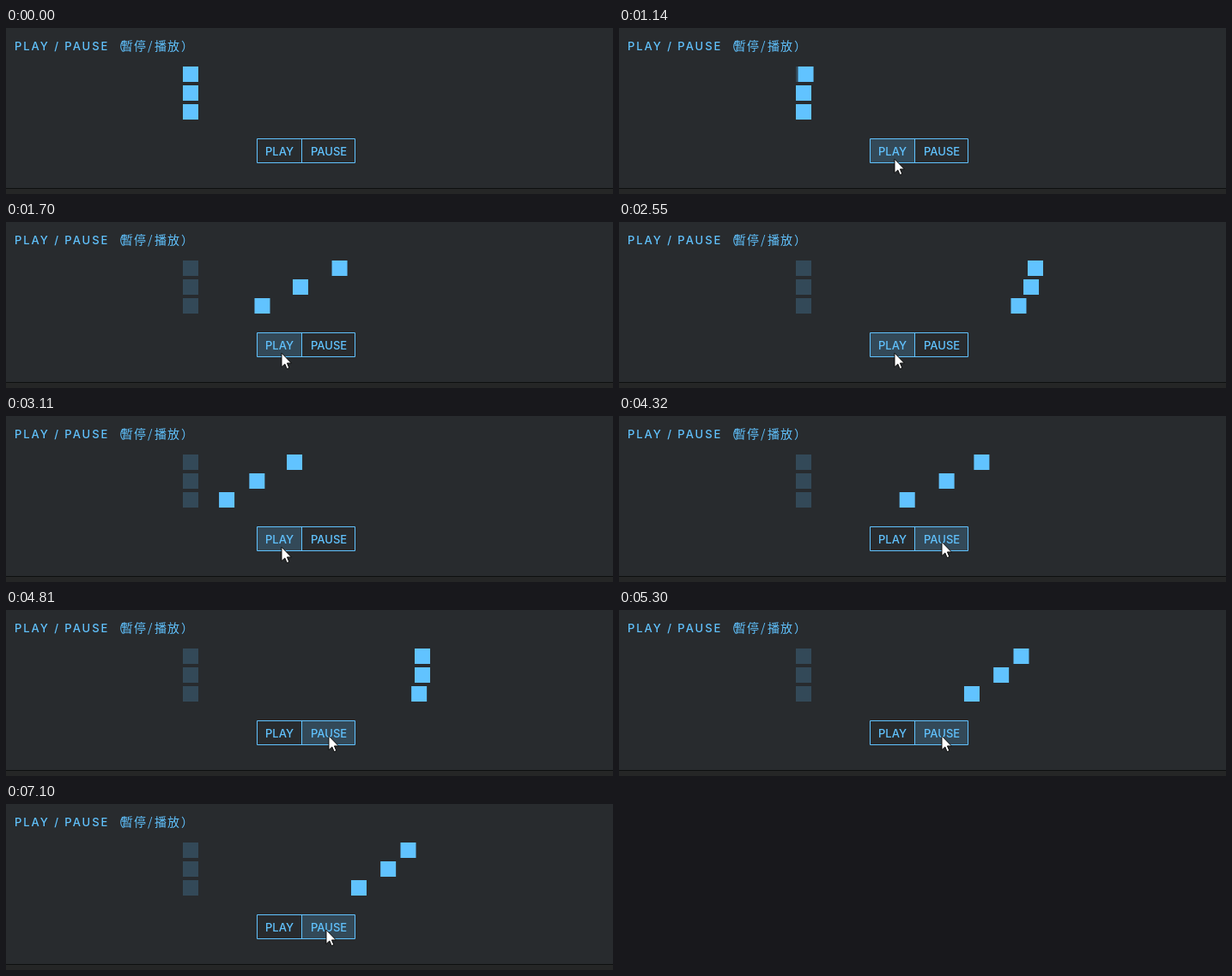
These frames come from a looping animation (707 px wide and 194 px high, 8 s). An HTML page:

```html
<!DOCTYPE html>
<html lang="zh-TW">
<head>
<meta charset="utf-8">
<title>Play / Pause</title>
<style>
  html, body { margin: 0; width: 100%; height: 100%; overflow: hidden; background: #282b2e; }
  svg { display: block; }
  text { fill: #61c3ff; font: 500 13px Inter, sans-serif; }
  .title { letter-spacing: 1.95px; }
  .cjk { font: 500 14px "Noto Sans CJK TC", "Noto Sans CJK", sans-serif; letter-spacing: 1px; }
  .ghost, .hover { fill: #61c3ff; fill-opacity: .2; }
  .box { fill: #61c3ff; }
  .frame { fill: none; stroke: #61c3ff; stroke-linejoin: round; }
</style>
</head>
<body>
<svg width="707" height="194" viewBox="0 0 707 194">
  <rect y="187" width="707" height="7" fill="#252626"/>
  <rect y="187" width="707" height="1" fill="#0e0f0f"/>
  <text class="title" x="10" y="26">PLAY / PAUSE</text>
  <text class="cjk" y="26"><tspan x="123.5">（</tspan><tspan x="134">暫停</tspan><tspan x="165">/</tspan><tspan x="173">播放</tspan><tspan x="204">）</tspan></text>
  <g id="boxes"></g>
  <rect class="hover" id="play" x="293" y="130" width="51" height="27"/>
  <rect class="hover" id="pause" x="345" y="130" width="61" height="27"/>
  <path class="frame" d="M292.5 129.5H406.5V157.5H292.5ZM344.5 129.5V157.5"/>
  <text x="302" y="149">PLAY</text>
  <text x="355" y="149">PAUSE</text>
  <g id="mouse">
    <path d="M0 .2V16.5L3.8 13 6.2 18.6 8.8 17.5 6.4 11.9H11.3Z" fill="#fff" stroke="#000" stroke-width=".9"/>
    <circle id="click" r="12" fill="#ff0" fill-opacity=".47"/>
  </g>
</svg>
<script>
const LOOP = 8000, STEP = 70, PASS = 1200, TRAVEL = 270;
const $ = id => document.getElementById(id);

// [time, playhead of the alternating tween]
const playhead = [[1070, 0], [1140, 50], [1700, 583], [2550, 1379], [3110, 1932],
  [3900, 2668], [4810, 3533], [5230, 3933], [5300, 3963]];
// [time, x, y]
const pointer = [[530, 329, 187], [810, 321, 153], [3690, 321, 153], [3900, 353, 151],
  [4040, 376, 147], [6310, 376, 147], [6440, 373, 147]];
const clicks = [[1010, 1140], [5230, 5300], [6970, 7100]];

const boxes = [45, 67, 89].map(y => {
  const [, box] = ['ghost', 'box'].map(name => {
    const r = document.createElementNS('http://www.w3.org/2000/svg', 'rect');
    const attrs = { class: name, x: 206, y, width: 18, height: 18 };
    for (const k in attrs) r.setAttribute(k, attrs[k]);
    return $('boxes').appendChild(r);
  });
  return box;
});

function sample(keys, t) {
  const i = keys.findLastIndex(k => k[0] <= t);
  if (i < 0) return keys[0].slice(1);
  const a = keys[i], b = keys[i + 1];
  if (!b) return a.slice(1);
  const p = Math.floor((t - a[0]) / STEP) * STEP / (b[0] - a[0]);
  return a.slice(1).map((v, j) => v + (b[j + 1] - v) * p);
}

const bezier = (s, a, b) => 3 * s * (1 - s) ** 2 * a + 3 * s * s * (1 - s) * b + s ** 3;

// cubic-bezier(.445, .05, .55, .95)
function easeInOutSine(p) {
  if (p <= 0) return 0;
  if (p >= 1) return 1;
  let lo = 0, hi = 1;
  for (let i = 0; i < 24; i++) {
    const s = (lo + hi) / 2;
    if (bezier(s, .445, .55) < p) lo = s; else hi = s;
  }
  return bezier(lo, .05, .95);
}

const show = (el, on) => { el.style.display = on ? '' : 'none'; };

function draw() {
  const t = performance.now() % LOOP;

  const [head] = sample(playhead, t);
  const time = PASS - Math.abs(head % (2 * PASS) - PASS);
  boxes.forEach((box, i) =>
    box.setAttribute('x', 206 + TRAVEL * easeInOutSine((time - i * 100) / 1000)));

  const [x, y] = sample(pointer, t).map(Math.round);
  const over = t >= 530 && y < 158;
  $('mouse').setAttribute('transform', `translate(${x} ${y})`);
  show($('mouse'), t >= 530);
  show($('play'), over && x < 345);
  show($('pause'), over && x >= 345);
  show($('click'), clicks.some(([a, b]) => t >= a && t < b));

  requestAnimationFrame(draw);
}
draw();
</script>
</body>
</html>
```
